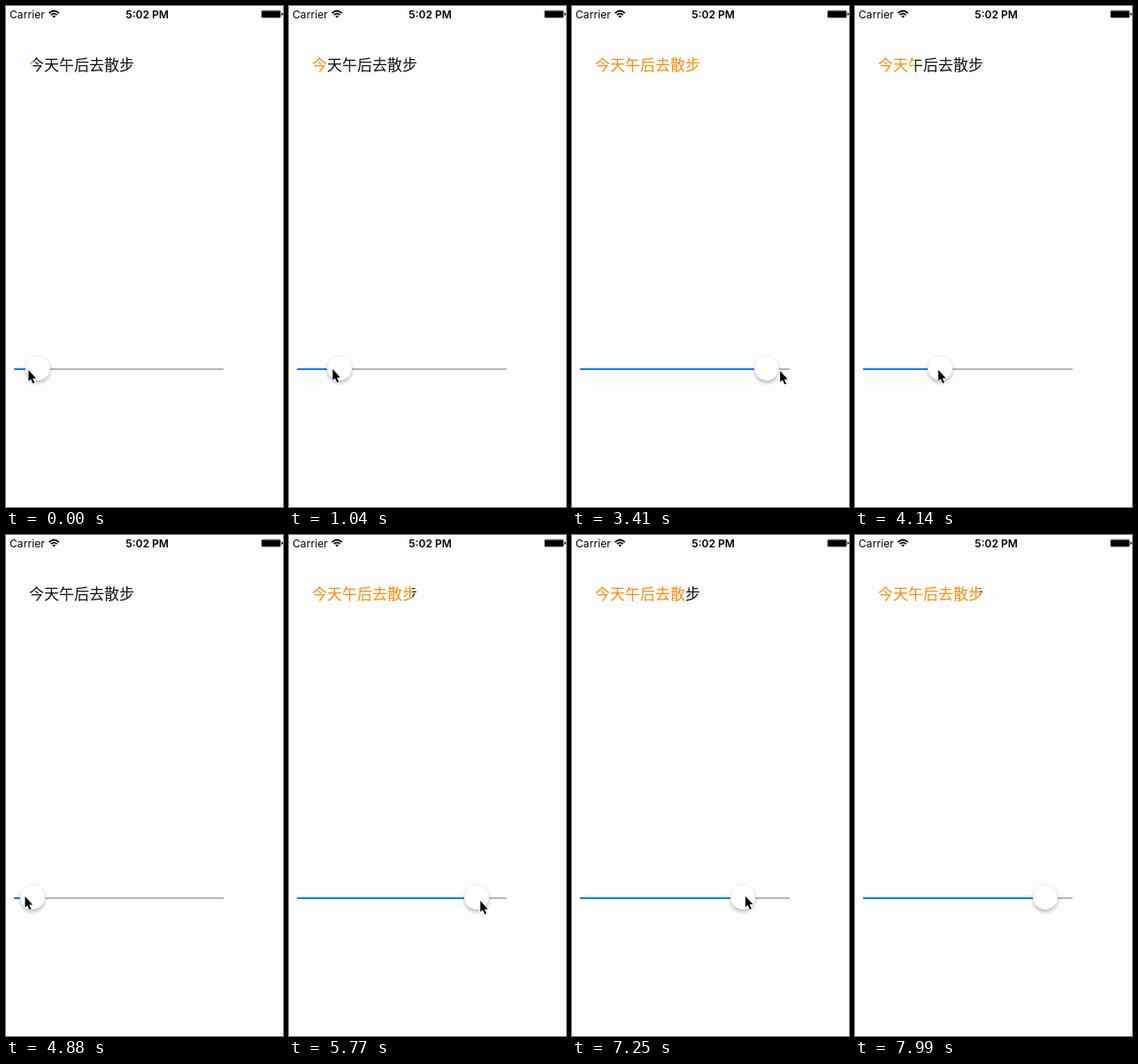
Write an HTML page that moves like this. It is 313 by 567 pixels and loops after 8520 ms.

```html
<!DOCTYPE html>
<html lang="zh">
<head>
<meta charset="utf-8">
<title>Slider text fill</title>
<style>
html, body { margin: 0; width: 100%; height: 100%; overflow: hidden; background: #fdfdfd; }
svg { display: block; width: 313px; height: 567px; }
.bar { font: 12px Inter, "Liberation Sans", sans-serif; }
.label { font: 17px "Noto Sans CJK SC", "Noto Sans CJK", sans-serif; }
</style>
</head>
<body>
<svg viewBox="0 0 313 567">
  <defs>
    <clipPath id="done"><rect id="doneBox" y="50" height="36"/></clipPath>
    <clipPath id="rest"><rect id="restBox" y="50" width="200" height="36"/></clipPath>
    <filter id="blur" x="-40%" y="-40%" width="180%" height="180%">
      <feGaussianBlur stdDeviation="2"/>
    </filter>
  </defs>
  <rect width="313" height="567" fill="#fdfdfd"/>

  <g class="bar">
    <text x="4" y="13.8" letter-spacing="0.1">Carrier</text>
    <text x="159.5" y="13.8" font-weight="600" text-anchor="middle">5:02 PM</text>
  </g>
  <g fill="none" stroke="#000" stroke-width="1.7">
    <path d="M48.6 8.1Q54.2 2.9 59.8 8.1"/>
    <path d="M50.7 10.2Q54.2 7 57.7 10.2"/>
  </g>
  <path d="M52.3 11.5Q54.2 9.9 56.1 11.5L54.2 13.5Z"/>
  <rect x="288.4" y="4.9" width="22.2" height="8.6" rx="1.6" fill="none" stroke="#000" stroke-opacity=".6" stroke-width=".5"/>
  <rect x="289" y="5.5" width="21" height="7.4" rx=".8"/>
  <path d="M311.3 7.5Q312.8 7.8 312.8 9.2T311.3 10.9Z"/>

  <g class="label">
    <text x="26" y="73.2" fill="#111" clip-path="url(#rest)">今天午后去散步</text>
    <text x="26" y="73.2" fill="#ff8c0a" clip-path="url(#done)">今天午后去散步</text>
  </g>

  <rect x="9" y="410" width="237" height="2" rx=".8" fill="#b4b4b4"/>
  <rect id="level" x="9" y="410" height="2" rx=".8" fill="#007aff"/>
  <g id="thumb">
    <circle cy="3" r="13.7" opacity=".26" filter="url(#blur)"/>
    <circle r="14.2" fill="#fff" stroke="#000" stroke-opacity=".13" stroke-width=".5"/>
  </g>
  <path id="pointer" d="M.4 1V13.6L3.1 11.2L5.4 16.2L7.3 15.3L5.1 10.4H9Z"
    stroke="#fff" stroke-width="1.6" stroke-linejoin="round" paint-order="stroke"/>
</svg>
<script>
const LOOP = 8520, STEP = 148;
const MIN = 22, MAX = 232;
const REGRAB = 33, RELEASE = 52;

// turning points of the drag: step, drag x, pointer y
const turns = [
  [0, 36, 411], [7, 57, 410], [15, 155, 411], [23, 220, 412],
  [31, 22, 410], [32, 22, 410], [33, 30, 408], [38, 242, 415],
  [40, 182, 411], [45, 6.5, 398], [48, 182, 407], [51, 215, 409]
];

const $ = id => document.getElementById(id);
const thumb = $("thumb"), pointer = $("pointer"), level = $("level");
const doneBox = $("doneBox"), restBox = $("restBox");
const mix = (a, b, k) => a + (b - a) * k;

function dragAt(step) {
  const i = turns.findIndex(p => p[0] > step);
  if (i < 0) return turns[turns.length - 1].slice(1);
  const [s0, x0, y0] = turns[i - 1], [s1, x1, y1] = turns[i];
  const k = (step - s0) / (s1 - s0);
  return [mix(x0, x1, k), mix(y0, y1, k)];
}

function draw(t) {
  const step = Math.floor(t / STEP + 0.08);
  const [drag, y] = dragAt(step);
  const x = Math.min(MAX, Math.max(MIN, drag));
  const edge = 27 + (x - 30) * 0.617;

  // each grab has its own offset; after release the pointer leaves the stage
  const grip = step < REGRAB ? 1.14 * drag - 16 : 1.07 * drag - 11;
  const away = Math.max(0, step - RELEASE);

  thumb.setAttribute("transform", `translate(${x} 409.8)`);
  pointer.setAttribute("transform", `translate(${grip + 42 * away} ${y + 140 * away})`);
  level.setAttribute("width", x - 9);
  doneBox.setAttribute("width", edge);
  restBox.setAttribute("x", edge);
}

const begin = performance.now();
function tick() {
  draw((performance.now() - begin) % LOOP);
  requestAnimationFrame(tick);
}
draw(0);
requestAnimationFrame(tick);
</script>
</body>
</html>
```
